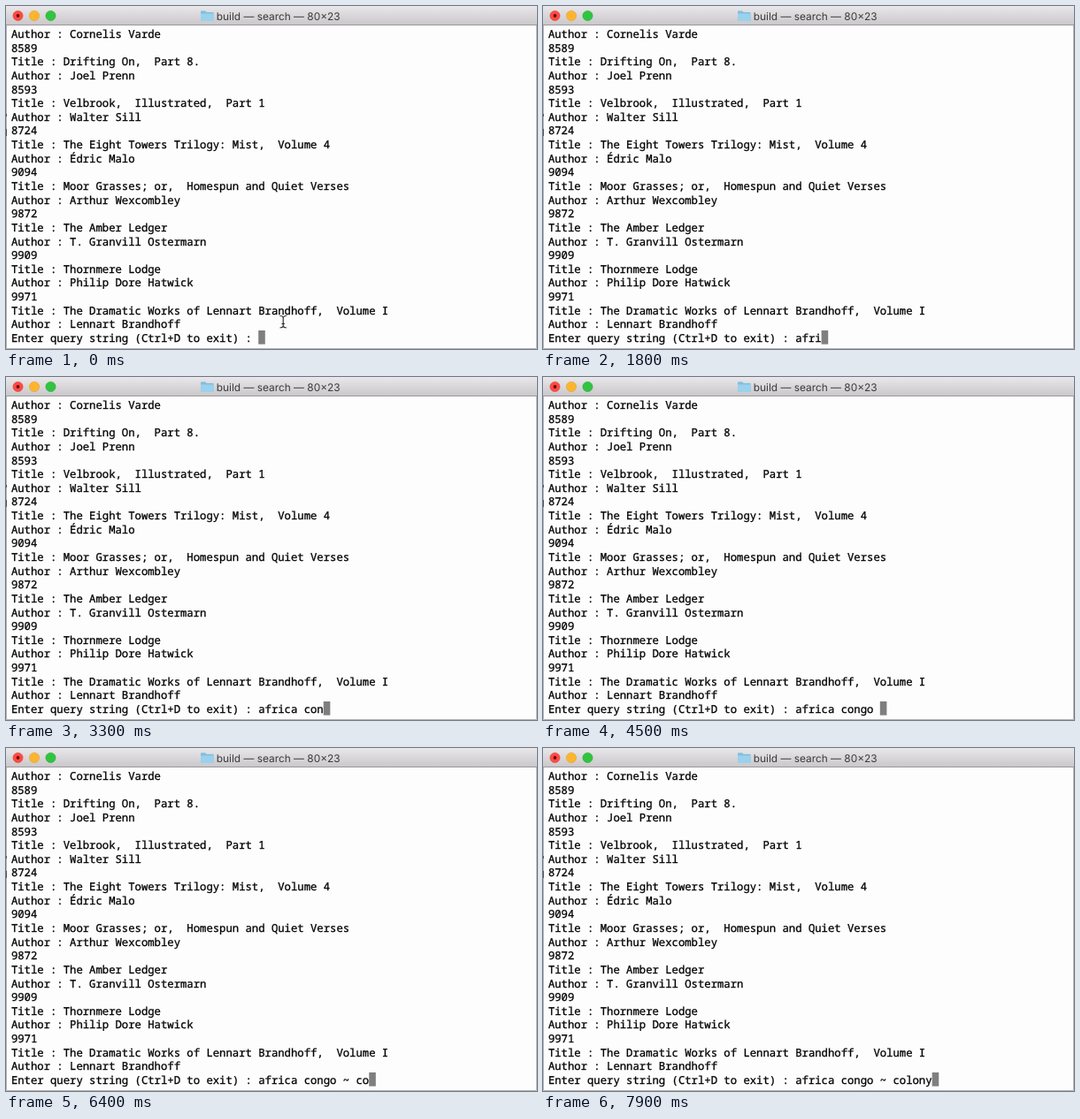
Animation of 600 by 388 pixels, one loop 8 s. Source, as an HTML page:

```html
<!DOCTYPE html>
<html lang="en">
<head>
<meta charset="utf-8">
<title>Terminal search</title>
<style>
  html, body { margin: 0; width: 100%; height: 100%; overflow: hidden; background: #fefdfe; }
  svg { display: block; width: 100vw; height: 100vh; }
  text { white-space: pre; text-rendering: geometricPrecision; }
  .mono {
    font: 500 12.258px "Noto Sans Mono", "DejaVu Sans Mono", monospace;
    fill: #000; stroke: #000; stroke-width: .3px;
  }
  .title { font: 400 11.9px Inter, Roboto, sans-serif; fill: #3c3c3c; text-anchor: middle; }
</style>
</head>
<body>
<svg viewBox="0 0 600 388">
  <defs>
    <linearGradient id="bar" x2="0" y2="1">
      <stop offset="0" stop-color="#e9e7e9"/>
      <stop offset="1" stop-color="#cac8ca"/>
    </linearGradient>
  </defs>
  <rect width="600" height="388" fill="#fefdfe"/>
  <rect width="600" height="21" fill="url(#bar)"/>
  <rect y="21" width="600" height="1" fill="#9a989a"/>
  <path d="M.5 22V387.500H599.500V22" fill="none" stroke="#b4b3b4"/>
  <path d="M.5 122v3M.5 139v8" stroke="#555"/>

  <g stroke-width=".6">
    <circle cx="13.5" cy="11" r="5.6" fill="#fd4a43" stroke="#e2443f"/>
    <circle cx="32" cy="11" r="5.6" fill="#fdb52e" stroke="#e0a132"/>
    <circle cx="50.5" cy="11" r="5.6" fill="#30c440" stroke="#2bab38"/>
  </g>
  <circle cx="13.5" cy="11" r="1.9" fill="#6e0906"/>

  <path d="M220 6.3q0-.8.8-.8h4.4l1.4 1.4h7.2q.8 0 .8.8v8.500q0 .8-.8.8h-13q-.8 0-.8-.8z" fill="#7fbfe0"/>
  <path d="M220 8.500h14.600v7.700q0 .8-.8.8h-13q-.8 0-.8-.8z" fill="#9bd1ec"/>
  <text class="title" x="307.700" y="15.700">build — search — 80×23</text>

  <g id="lines"></g>
  <text id="prompt" class="mono"></text>
  <rect id="cursor" y="367" width="7.600" height="15.600" fill="#7f7f7f"/>
  <path id="pointer" d="M309.500 350.500q3 0 3.700 1.700q.7-1.700 3.700-1.700M313.200 352v10.500M309.500 364q3 0 3.700-1.700q.7 1.700 3.700 1.700M311.500 359.500h3.400"
        fill="none" stroke="#222" stroke-width="1.100"/>
</svg>
<script>
const LOOP = 8000;
const LEFT = 5.9, BASELINE = 36, ROW = 15.636, CELL = 7.355;

const books = [
  ["", "", "Cornelis Varde"],
  [8589, "Drifting On,  Part 8.", "Joel Prenn"],
  [8593, "Velbrook,  Illustrated,  Part 1", "Walter Sill"],
  [8724, "The Eight Towers Trilogy: Mist,  Volume 4", "Édric Malo"],
  [9094, "Moor Grasses; or,  Homespun and Quiet Verses", "Arthur Wexcombley"],
  [9872, "The Amber Ledger", "T. Granvill Ostermarn"],
  [9909, "Thornmere Lodge", "Philip Dore Hatwick"],
  [9971, "The Dramatic Works of Lennart Brandhoff,  Volume I", "Lennart Brandhoff"]
];
// The first entry has scrolled up so that only its author shows.
const rows = books.flatMap(([id, title, author]) =>
  [`${id}`, `Title : ${title}`, `Author : ${author}`]).slice(2);

const promptText = "Enter query string (Ctrl+D to exit) : ";
const query = "africa congo ~ colony";
const keyTimes = [
  900, 1100, 1400, 1700, 2000, 2300, 2700,
  2800, 3000, 3200, 3500, 3800, 4200,
  5000, 5900,
  6200, 6400, 6700, 6900, 7100, 7400
];

const byId = id => document.getElementById(id);
const lines = byId("lines"), prompt = byId("prompt");
const cursor = byId("cursor"), pointer = byId("pointer");

function placeRow(node, index) {
  node.setAttribute("x", LEFT);
  node.setAttribute("y", BASELINE + index * ROW);
}

rows.forEach((row, index) => {
  const node = document.createElementNS("http://www.w3.org/2000/svg", "text");
  node.setAttribute("class", "mono");
  node.textContent = row;
  placeRow(node, index);
  lines.append(node);
});
placeRow(prompt, rows.length);

function render(time) {
  const typed = keyTimes.filter(key => key <= time).length;
  const line = promptText + query.slice(0, typed);
  prompt.textContent = line;
  cursor.setAttribute("x", LEFT + line.length * CELL - 0.2);
  pointer.style.display = typed ? "none" : "";
}

const start = performance.now();
function tick() {
  render((performance.now() - start) % LOOP);
  requestAnimationFrame(tick);
}
tick();
</script>
</body>
</html>
```
